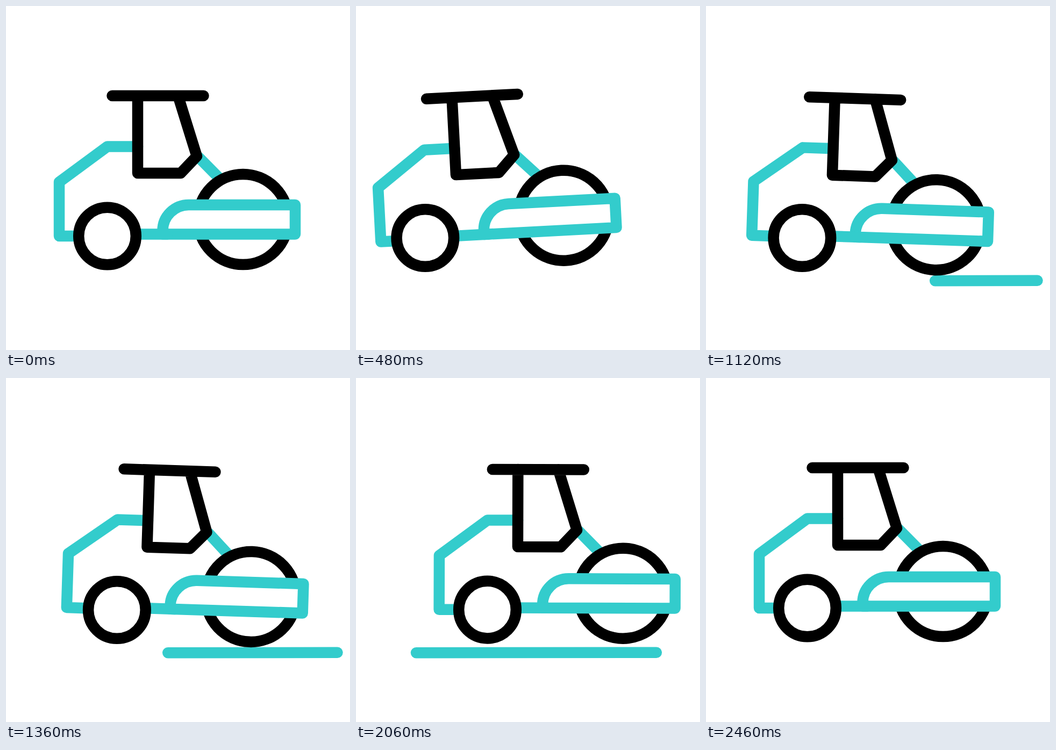
An HTML page for the animation above (2.64 s loop, 640x640 px).

```html
<!DOCTYPE html>
<html lang="en">
<head>
<meta charset="utf-8">
<title>Road roller</title>
<style>
  html, body { margin: 0; width: 100%; height: 100%; overflow: hidden; background: #fff; }
  svg { display: block; width: 100%; height: 100%; }
  .ink, .teal { fill: none; stroke-width: 20.5; stroke-linecap: round; stroke-linejoin: round; }
  .ink { stroke: #000; }
  .teal { stroke: #33cccc; }
  .solid { fill: #fff; }
</style>
</head>
<body>
<svg viewBox="0 0 640 640">
  <path id="road" class="teal"/>
  <g id="truck">
    <g id="body">
      <path class="teal" d="M245 261.5H188.5L99 327.5V428H150"/>
      <path class="teal" d="M358 281L395 318.5"/>
      <circle class="ink solid" cx="441" cy="397" r="84"/>
      <path class="teal solid" d="M291.5 424.5V418A48.5 48 0 0 1 340 370H538V424.5Z"/>
      <path class="teal" d="M230 424.5H300"/>
      <path class="ink" d="M245 167V311H325L355 279.5L320 167M197.5 167H367.5"/>
    </g>
    <circle class="ink solid" cx="188.5" cy="428" r="53.3"/>
  </g>
</svg>
<script>
const LOOP = 2640;
const PIVOT = '238 298';
const $ = id => document.getElementById(id);
const road = $('road'), truck = $('truck'), body = $('body');

// Cubic ease with flat ends; a and b are the horizontal handle positions.
function ease(u, a = 1 / 3, b = 2 / 3) {
  let lo = 0, hi = 1;
  for (let i = 0; i < 24; i++) {
    const s = (lo + hi) / 2, r = 1 - s;
    if (3 * a * s * r * r + 3 * b * s * s * r + s * s * s < u) lo = s;
    else hi = s;
  }
  return lo * lo * (3 - 2 * lo);
}

// Each key: [time, value, handle a, handle b]; the handles shape the way to that key.
function track(keys, t) {
  if (t <= keys[0][0]) return keys[0][1];
  for (let i = 1; i < keys.length; i++) {
    const [t0, v0] = keys[i - 1], [t1, v1, a, b] = keys[i];
    if (t < t1) return v0 + (v1 - v0) * ease((t - t0) / (t1 - t0), a, b);
  }
  return keys[keys.length - 1][1];
}

const shiftX = [[0, 0], [480, -59.7], [1960, 63.2, 0.28, 0.72], [2440, 0]];
const shiftY = [[0, 0], [480, 3.5], [1960, 3.5], [2440, 0]];
const tilt = [[0, 0], [480, -3], [1200, 1.95, 0.333, 0.31], [2240, 0]];
const roadLeft = [[520, 616.5], [1960, 112]];
const roadRight = [[1960, 616.5], [2440, 112]];

function draw(t) {
  truck.setAttribute('transform', `translate(${track(shiftX, t)} ${track(shiftY, t)})`);
  body.setAttribute('transform', `rotate(${track(tilt, t)} ${PIVOT})`);
  const visible = t > 520 && t < 2440;
  road.setAttribute('d', visible
    ? `M${track(roadRight, t)} 510.8L${track(roadLeft, t) - 0.01} 511.2`
    : '');
}

const start = performance.now();
function tick() {
  draw((performance.now() - start) % LOOP);
  requestAnimationFrame(tick);
}
tick();
</script>
</body>
</html>
```
